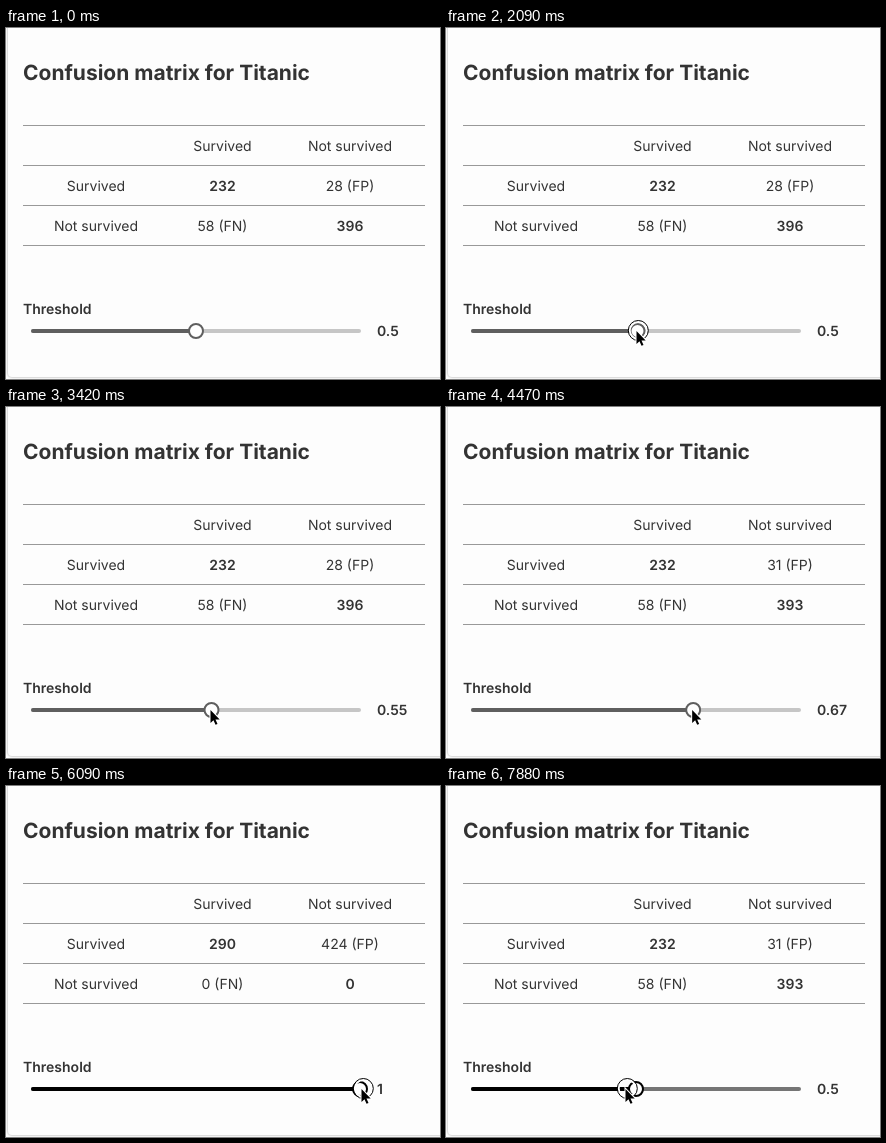
Animation, 434 px wide and 351 px high, one loop 8000 ms. Source, as an HTML page:

```html
<!DOCTYPE html>
<html lang="en">
<head>
<meta charset="utf-8">
<title>Confusion matrix</title>
<style>
  html, body { margin: 0; width: 100%; height: 100%; overflow: hidden; background: #fff; }
  .stage { position: fixed; inset: 0; overflow: hidden; contain: strict; }
  .card {
    position: absolute; inset: -10px -10px 2px 2px;
    background: #fdfdfd; border-radius: 4px; box-shadow: 0 0 2px 1px #d0d0d0;
  }
  svg { position: absolute; inset: 0; width: 100%; height: 100%; display: block; }
  text { font: 400 14px Inter, sans-serif; fill: #333; text-rendering: geometricPrecision; }
  .bold { font-weight: 600; }
  .title { font-size: 21px; font-weight: 700; }
  .cell { text-anchor: middle; }
  .rule { stroke: #999; }
  .track { stroke-width: 4; stroke-linecap: round; }
</style>
</head>
<body>
<div class="stage">
  <div class="card"></div>
  <svg viewBox="0 0 434 351">
    <text class="title" x="17" y="52">Confusion matrix for Titanic</text>
    <g id="table"></g>
    <text class="bold" x="17" y="286">Threshold</text>
    <line id="rest" class="track" x1="27" x2="353" y1="303" y2="303"/>
    <line id="done" class="track" x1="27" y1="303" y2="303"/>
    <circle id="thumb" cy="303" r="7" fill="#fff" stroke-width="2"/>
    <text id="value" class="bold" x="371" y="308"></text>
    <g id="ring" fill="none">
      <circle r="8.6" stroke="#fff" stroke-width="2"/>
      <circle r="10" stroke="#000"/>
    </g>
    <path id="arrow" d="M0 0V13L3 10.3L5 14.8L7 13.9L5 9.6H9.2Z" stroke="#fff" stroke-width="2" paint-order="stroke"/>
  </svg>
</div>
<script>
const LOOP = 8000, TICK = 148.7;
const $ = id => document.getElementById(id);

function set(el, attrs) {
  for (const k in attrs) el.setAttribute(k, attrs[k]);
}
function add(tag, attrs, text = '') {
  const el = document.createElementNS('http://www.w3.org/2000/svg', tag);
  set(el, attrs);
  el.textContent = text;
  return $('table').appendChild(el);
}
const cell = (col, row, text, bold) =>
  add('text', { x: [90, 216.5, 344][col], y: 123 + row * 40, class: bold ? 'cell bold' : 'cell' }, text);

for (let i = 0; i < 4; i++) {
  const y = 97.5 + i * 40;
  add('line', { x1: 17, x2: 419, y1: y, y2: y, class: 'rule' });
}
['Survived', 'Not survived'].forEach((name, i) => {
  cell(i + 1, 0, name);
  cell(0, i + 1, name);
});
const tp = cell(1, 1, '', true), fp = cell(2, 1, '');
const fn = cell(1, 2, ''), tn = cell(2, 2, '', true);

const clamp = (v, lo, hi) => Math.min(hi, Math.max(lo, v));

// Drag key points: tick, pointer x
const DRAG = [[14, 190], [23, 204], [27, 215], [36, 307], [41, 355], [42, 355], [48, 222], [53, 179]];

function pointer(n) {
  if (n < DRAG[0][0]) {
    const left = 81 * (1 - clamp((n - 4) / 5, 0, 1)) ** 1.4;
    return [190 + left, 303 + left * 0.26];
  }
  const i = Math.max(1, DRAG.findIndex(p => p[0] >= n));
  const [[n0, x0], [n1, x1]] = DRAG.slice(i - 1, i + 1);
  return [x0 + (x1 - x0) * (n - n0) / (n1 - n0), 303];
}

// False positives and negatives, refreshed as the slider settles
function counts(n) {
  if (n < 24) return [28, 58];
  if (n < 31 || n >= 52) return [31, 58];
  return n < 40 ? [71, 40] : [424, 0];
}

function draw(n) {
  const [x, y] = pointer(n);
  const thumbX = n < 13 ? 190 : clamp(x + 1.5, 190, 354);
  const active = n >= 40;
  const pressed = active || (n >= 13 && n < 17);
  const dark = active ? '#000' : '#5f5f5f';
  const show = on => on ? 'visible' : 'hidden';

  set($('rest'), { stroke: active ? '#757575' : '#c6c6c6' });
  set($('done'), { x2: Math.min(353, thumbX), stroke: dark });
  set($('thumb'), { cx: thumbX, stroke: dark });
  set($('arrow'), { transform: `translate(${x + 0.5} ${y})`, visibility: show(n >= 4) });
  set($('ring'), { transform: `translate(${x + 2.3} ${y - 0.5})`, visibility: show(pressed) });
  $('value').textContent = Math.round((thumbX - 25) / 3.3) / 100;

  const [p, q] = counts(n);
  tp.textContent = 290 - q;
  fp.textContent = `${p} (FP)`;
  fn.textContent = `${q} (FN)`;
  tn.textContent = 424 - p;
}

const start = performance.now();
function frame(now) {
  const t = Math.max(0, now - start) % LOOP;
  draw(Math.min(53, Math.floor((t + 10) / TICK)));
  requestAnimationFrame(frame);
}
draw(0);
requestAnimationFrame(frame);
</script>
</body>
</html>
```
